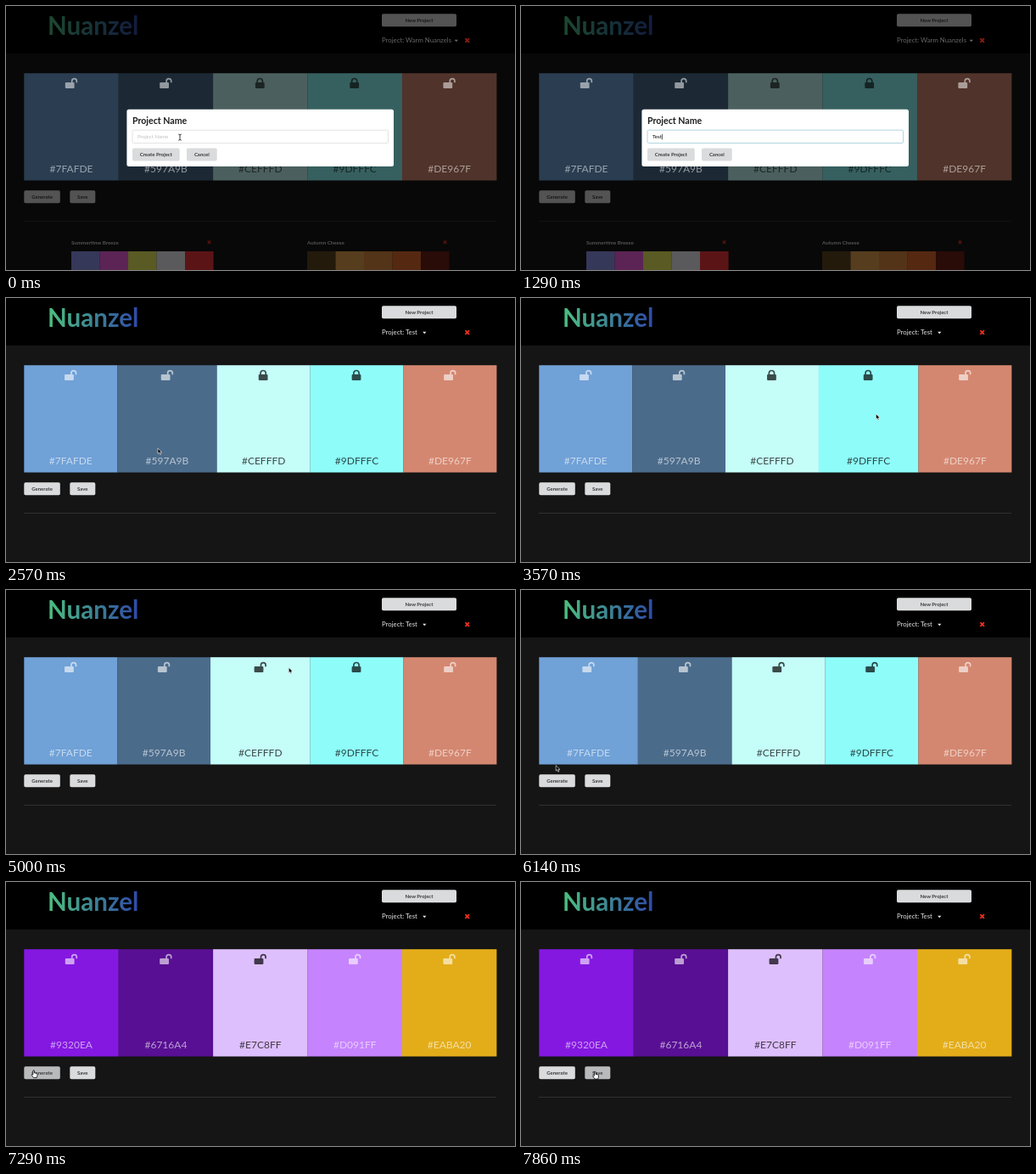
An HTML page for the animation above (8000 ms loop, 600 px wide and 311 px high).

```html
<!DOCTYPE html>
<html lang="en">
<head>
<meta charset="utf-8">
<title>Palette generator</title>
<style>
html, body { margin: 0; width: 100%; height: 100%; overflow: hidden; background: #151515; }
svg { display: block; width: 100%; height: 100%; font-family: Lato, sans-serif; }
.btn rect { fill: #dadbdc; }
.btn.hover rect { fill: #b9babb; }
.btn text { font-size: 6px; font-weight: 700; fill: #3b3b3b; text-anchor: middle; }
.hex { font-size: 12px; text-anchor: middle; }
.title { font-size: 6.2px; font-weight: 700; fill: #ddd; }
</style>
</head>
<body>
<svg id="stage" viewBox="0 0 600 311" xmlns="http://www.w3.org/2000/svg">
  <defs>
    <linearGradient id="brand" gradientUnits="userSpaceOnUse" x1="50" y1="0" x2="155" y2="0">
      <stop offset="0" stop-color="#4cbf7f"/><stop offset="1" stop-color="#2f4ba8"/>
    </linearGradient>
    <path id="cross" d="M-2.3-2.3 2.3 2.3M2.3-2.3-2.3 2.3" stroke="#e8301f" stroke-width="1.9"/>
  </defs>
  <rect width="600" height="311" fill="#151515"/>
  <rect width="600" height="56" fill="#000"/>
  <text x="49" y="34" font-size="29.6" font-weight="700" fill="url(#brand)">Nuanzel</text>
  <path d="M21 253.5H578" stroke="#303030"/>
  <g id="panes"></g>
  <g id="buttons"></g>
  <g id="cards"></g>
  <rect id="dimmer" width="600" height="311" fill="#000"/>
  <g id="project">
    <text id="projectName" x="443" y="43" font-size="7.8" fill="#e8e8e8"></text>
    <path id="caret" d="M-2.2-1.1H2.2L0 1.4Z" fill="#e8e8e8"/>
  </g>
  <use id="remove" href="#cross" x="543.7" y="40.5"/>
  <g id="labels"></g>
  <g id="modal">
    <rect x="142.4" y="121.7" width="314.6" height="67.3" rx="2.5" fill="#fff"/>
    <text x="149" y="139.2" font-size="10.6" font-weight="700" fill="#1d1d1d">Project Name</text>
    <rect id="field" x="149" y="146.2" width="301.5" height="15.3" rx="1.5" fill="#fff"/>
    <text id="entry" x="155" y="156.3" font-size="6.1"></text>
    <path id="bar" d="M0 150.8V157.5" stroke="#222" stroke-width=".7"/>
  </g>
  <g id="cursor" stroke-linejoin="round">
    <path id="arrow" d="M0 0V6.4L1.5 5.1 2.6 7.5 3.7 7 2.7 4.7H4.7Z" fill="#000" stroke="#fff" stroke-width=".6"/>
    <path id="ibeam" d="M-1.7-3.4Q0-3.4 0-2.4Q0-3.4 1.7-3.4M0-2.6V2.8M-1.7 3.6Q0 3.6 0 2.6Q0 3.6 1.7 3.6" fill="none" stroke="#222" stroke-width=".9"/>
    <path id="hand" d="M0 0Q1.1-.8 1.5.4V3Q4.8 2.6 4.9 4.5V6.4L4.1 8.6H.5L-1.9 5.2Q-1.7 4-.2 4.9Z" fill="#fff" stroke="#000" stroke-width=".8"/>
  </g>
</svg>
<script>
const LOOP = 8000, FPS = 7;
const $ = id => document.getElementById(id);

function add(parent, tag, attrs = {}, text = '') {
  const node = document.createElementNS('http://www.w3.org/2000/svg', tag);
  set(node, attrs);
  node.textContent = text;
  return parent.appendChild(node);
}
function set(node, attrs) {
  for (const key in attrs) node.setAttribute(key, attrs[key]);
}
function show(node, visible) {
  node.style.display = visible ? '' : 'none';
}
function button(parent, x, y, width, label) {
  const group = add(parent, 'g', { class: 'btn' });
  add(group, 'rect', { x, y, width, height: 15, rx: 1.8 });
  add(group, 'text', { x: x + width / 2, y: y + 9.6 }, label);
  return group;
}

button($('buttons'), 443, 9.3, 88, 'New Project');
const generate = button($('buttons'), 21.3, 217.2, 42.5, 'Generate');
const save = button($('buttons'), 75.3, 217.2, 30, 'Save');
const create = button($('modal'), 149, 167.5, 55.7, 'Create Project');
button($('modal'), 213, 167.5, 35.7, 'Cancel');

function card(x, title, colors) {
  add($('cards'), 'text', { x, y: 280.5, class: 'title' }, title);
  add($('cards'), 'use', { href: '#cross', transform: `translate(${x + 162.5} 278.3) scale(.75)` });
  colors.forEach((fill, i) =>
    add($('cards'), 'rect', { x: x + i * 33.5, y: 289, width: 33.6, height: 22, fill }));
}
card(77, 'Summertime Breeze', ['#8f93ee', '#f060e0', '#eaee60', '#eeeaf0', '#f0363a']);
card(355, 'Autumn Cheese', ['#5c4420', '#e0a04c', '#dc8a40', '#e06a2c', '#6c1c14']);

// Hex label, shown colour [r, g, b], ink (255 light, 0 dark)
const before = [
  ['#7FAFDE', [112, 161, 215], 255], ['#597A9B', [75, 107, 139], 255],
  ['#CEFFFD', [197, 253, 249], 0], ['#9DFFFC', [142, 253, 250], 0],
  ['#DE967F', [212, 135, 112], 255]
];
const after = [
  ['#9320EA', [132, 24, 225], 255], ['#6716A4', [88, 15, 147], 255],
  ['#E7C8FF', [222, 191, 253], 0], ['#D091FF', [198, 131, 254], 255],
  ['#EABA20', [227, 173, 26], 255]
];
const panes = before.map(() => {
  const label = add($('labels'), 'g');
  add(label, 'rect', { x: -5.4, y: 90, width: 10.8, height: 7, rx: 1.1 });
  return {
    rect: add($('panes'), 'rect', { y: 79.2, height: 126.3 }),
    label,
    shackle: add(label, 'path', { fill: 'none', stroke: 'currentColor', 'stroke-width': 1.7 }),
    hex: add(label, 'text', { class: 'hex', y: 195.6 })
  };
});
const SHACKLE_SHUT = 'M-3.1 90V88.5A3.1 3 0 0 1 3.1 88.5V90';
const SHACKLE_OPEN = 'M2.5 90V88.3A2.8 2.7 0 0 1 8.1 88.3V90.3';

// [from, to, pane]
const hovers = [
  [2290, 2900, 1], [2900, 3200, 2], [3200, 4100, 3], [4100, 5100, 2],
  [5100, 5560, 3], [5560, 5770, 2], [5770, 5980, 1], [5980, 6140, 0]
];
const unlockAt = [0, 0, 4560, 5420, 0];
const typed = [[570, 'T'], [850, 'Te'], [995, 'Tes'], [1140, 'Test']];
// [time, x, y]
const path = [
  [0, 205, 154.5], [140, 205, 154.5], [285, 196, 154.5], [1570, 200, 158],
  [1857, 179, 177], [2572, 179, 177], [2900, 245, 162], [3200, 352, 146],
  [3572, 418.5, 136.5], [3715, 418, 130], [4100, 358, 100], [4430, 299, 91],
  [4720, 299, 91], [5000, 333.3, 91.3], [5285, 411, 91], [5450, 411, 91],
  [6145, 40, 207], [6300, 32, 222], [7290, 32, 222], [7600, 86.5, 223.5], [LOOP, 86.5, 223.5]
];

const mix = (a, b, k) => a + (b - a) * k;
function ease(t, start, length) {
  const k = Math.min(1, Math.max(0, (t - start) / length));
  return 1 - (1 - k) ** 2;
}
const dimAt = t => 1 - ease(t, 1950, 400);
function pointer(t) {
  const i = path.findIndex(key => key[0] > t);
  const [t0, x0, y0] = path[i - 1], [t1, x1, y1] = path[i];
  const k = (t - t0) / (t1 - t0);
  return [mix(x0, x1, k), mix(y0, y1, k)];
}

function drawPanes(t) {
  const weights = before.map((_, i) => hovers.reduce((sum, [from, to, pane]) =>
    pane === i ? sum + .07 * (ease(t, from, 250) - ease(t, to, 250)) : sum, 1));
  const total = weights.reduce((a, b) => a + b);
  const blend = ease(t, 6700, 500);
  let x = 21.3;
  panes.forEach((pane, i) => {
    const width = 557 * weights[i] / total;
    const [, from, inkFrom] = before[i], [, to, inkTo] = after[i];
    const color = from.map((v, c) => Math.round(mix(v, to[c], blend)));
    const ink = Math.round(mix(inkFrom, inkTo, blend));
    const alpha = mix(.7, .6, ink / 255) - .08 * dimAt(t);
    const open = t >= unlockAt[i];
    set(pane.rect, { x, width: width + .1, fill: `rgb(${color})` });
    set(pane.label, {
      transform: `translate(${x + width / 2} 0)`,
      fill: `rgb(${ink},${ink},${ink})`, color: `rgb(${ink},${ink},${ink})`, opacity: alpha
    });
    const icon = { transform: `translate(${open ? -1.8 : -.5} 0)` };
    set(pane.label.firstChild, icon);
    set(pane.shackle, { ...icon, d: open ? SHACKLE_OPEN : SHACKLE_SHUT });
    pane.hex.textContent = (t < 6700 ? before : after)[i][0];
    x += width;
  });
}

function drawModal(t) {
  const dim = dimAt(t);
  const focused = t >= 280;
  const value = typed.reduce((text, [at, next]) => t >= at ? next : text, '');
  show($('modal'), dim > 0);
  set($('modal'), {
    opacity: dim,
    transform: `translate(300 155) scale(${.9 + .1 * dim}) translate(-300 -155)`
  });
  set($('dimmer'), { opacity: .62 * dim });
  set($('project'), { opacity: 1 - .56 * dim });
  set($('remove'), { opacity: 1 - .4 * dim });
  set($('field'), { stroke: focused ? '#9fcbd9' : '#dcdcdc', 'stroke-width': .8 });
  $('entry').textContent = value || 'Project Name';
  set($('entry'), { fill: value ? '#000' : '#c0c0c0' });
  const end = value ? $('entry').getComputedTextLength() : 0;
  set($('bar'), { transform: `translate(${155.5 + end} 0)` });
  show($('bar'), focused && t < 1850);
}

function drawCursor(t) {
  const [x, y] = pointer(t);
  const overButton = (t >= 1800 && t < 2250) || (t >= 6250 && t < 7340) || t >= 7480;
  const kind = t < 1600 ? 'ibeam' : overButton ? 'hand' : 'arrow';
  for (const id of ['arrow', 'ibeam', 'hand']) show($(id), id === kind);
  show($('cursor'), t < 560 || t >= 1565);
  set($('cursor'), { transform: `translate(${x} ${y})` });
}

function draw(t) {
  const fresh = t >= 2100;
  show($('cards'), !fresh);
  $('projectName').textContent = fresh ? 'Project: Test' : 'Project: Warm Nuanzels';
  set($('caret'), { transform: `translate(${fresh ? 493.3 : 530.8} 40.8)` });
  create.classList.toggle('hover', t >= 1800);
  generate.classList.toggle('hover', t >= 6250 && t < 7400);
  save.classList.toggle('hover', t >= 7500);
  drawPanes(t);
  drawModal(t);
  drawCursor(t);
}

// The picture advances seven times a second, like a screen recording.
const start = performance.now();
function tick(now) {
  const t = Math.max(0, now - start) % LOOP;
  const step = Math.floor((t + 5) * FPS / 1000);
  draw(Math.min(step * 1000 / FPS, LOOP - 1));
  requestAnimationFrame(tick);
}
requestAnimationFrame(tick);
</script>
</body>
</html>
```
